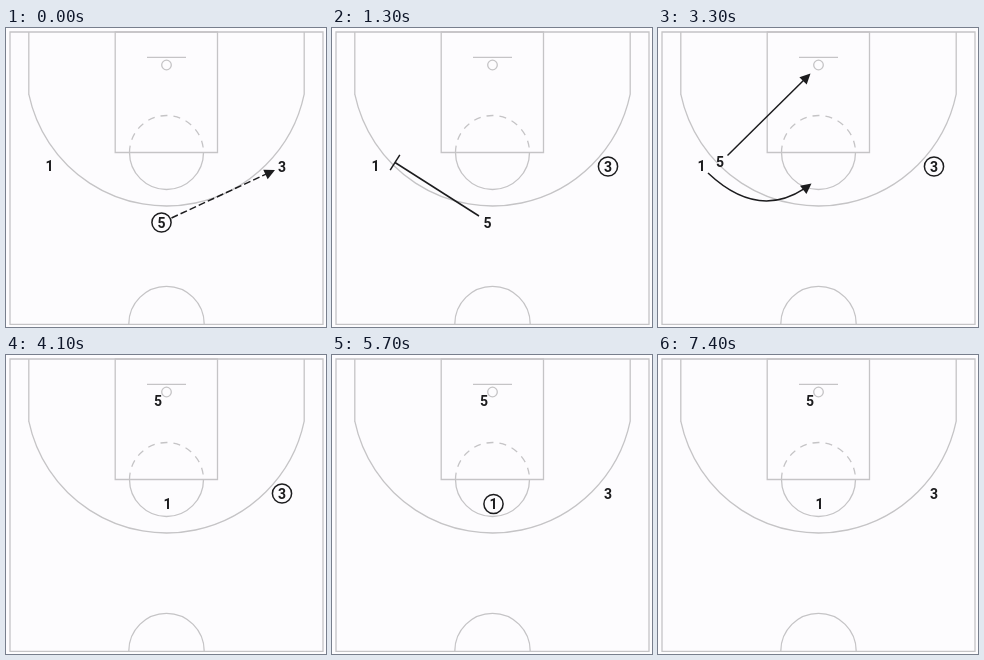
An HTML page with a canvas for the animation above (7500 ms loop, 320 by 299 pixels).

```html
<!DOCTYPE html>
<html lang="en">
<head>
<meta charset="utf-8">
<title>Basketball play</title>
<style>
html, body { margin: 0; width: 100%; height: 100%; overflow: hidden; background: #fdfcfe; }
canvas { display: block; width: 320px; height: 299px; }
</style>
</head>
<body>
<canvas id="stage"></canvas>
<script>
const LOOP = 7500, STEP = 100;
const INK = '#1c1c1e', LINE = '#c5c4c6';
const canvas = document.getElementById('stage');
const ctx = canvas.getContext('2d');
const ratio = window.devicePixelRatio || 1;
canvas.width = 320 * ratio;
canvas.height = 299 * ratio;
ctx.scale(ratio, ratio);

const progress = (t, start, end) => Math.min(1, Math.max(0, (t - start) / (end - start)));
const mix = (a, b, p) => [a[0] + (b[0] - a[0]) * p, a[1] + (b[1] - a[1]) * p];
const curve = (a, c, b, p) => mix(mix(a, c, p), mix(c, b, p), p);

function stroke(color, width, build, dash = []) {
  ctx.strokeStyle = color;
  ctx.lineWidth = width;
  ctx.setLineDash(dash);
  ctx.beginPath();
  build();
  ctx.stroke();
  ctx.setLineDash([]);
}
const segment = (a, b) => { ctx.moveTo(...a); ctx.lineTo(...b); };
const circle = (c, r) => ctx.arc(c[0], c[1], r, 0, Math.PI * 2);

const HOOP = [160.5, 37];
const ONE = { start: [43.5, 137.5], bend: [103, 203], end: [161.5, 149] };
const FIVE = { start: [155.5, 194.5], screen: [62, 134], end: [152, 46] };
const THREE = [276, 138.5];

// Each mark is drawn from start to end, then capped, and stays until the next move.
const marks = [
  { from: [165.5, 190], to: [269, 142], start: -900, end: -200, until: 300, cap: head, dash: [7, 3] },
  { from: [147, 188], to: [63, 134.5], start: 600, end: 1200, until: 1900, cap: bar },
  { from: [50, 145], bend: [103, 195], to: [153.5, 155.5], start: 2200, end: 2970, until: 3800, cap: head },
  { from: [69.5, 127.5], to: [152.5, 45.5], start: 2700, end: 3200, until: 3800, cap: head },
  { from: [266, 139.5], to: [170, 148], start: 4100, end: 4700, until: 5400, cap: head, dash: [7, 3] },
  { from: [161.5, 139], to: [160.5, 40], start: 5700, end: 6200, until: 6900, cap: target, dash: [7, 3] }
];

function head(tip, angle) {
  ctx.save();
  ctx.translate(...tip);
  ctx.rotate(angle);
  ctx.fillStyle = INK;
  ctx.beginPath();
  ctx.moveTo(0, 0);
  ctx.lineTo(-10.5, -5.2);
  ctx.lineTo(-10.5, 5.2);
  ctx.fill();
  ctx.restore();
}

function bar([x, y], angle) {
  const dx = -Math.sin(angle) * 9, dy = Math.cos(angle) * 9;
  stroke(INK, 1.5, () => segment([x - dx, y - dy], [x + dx, y + dy]));
}

function target() {
  const [x, y] = HOOP;
  stroke(INK, 1.5, () => circle(HOOP, 6));
  stroke(INK, 1.5, () => {
    for (const s of [-1, 1]) {
      segment([x + 3 * s, y], [x + 9 * s, y]);
      segment([x, y + 3 * s], [x, y + 9 * s]);
    }
  });
}

function drawMark(mark, t) {
  if (t <= mark.start || t > mark.until) return;
  const { from, to, cap } = mark;
  const bend = mark.bend || mix(from, to, 0.5);
  const reach = progress(t, mark.start, mark.end) * (cap === head ? 0.93 : 1);
  stroke(INK, 1.5, () => {
    ctx.moveTo(...from);
    ctx.quadraticCurveTo(...mix(from, bend, reach), ...curve(from, bend, to, reach));
  }, mark.dash);
  if (t > mark.end) cap(to, Math.atan2(to[1] - bend[1], to[0] - bend[0]));
}

function drawCourt() {
  const lane = [160.5, 124.5];
  ctx.fillStyle = '#fdfcfe';
  ctx.fillRect(0, 0, 320, 299);
  const court = (build, dash) => stroke(LINE, 1.3, build, dash);
  court(() => ctx.rect(4, 4, 313, 292.3));
  court(() => {
    ctx.moveTo(22.8, 4);
    ctx.lineTo(22.8, 67);
    const radius = 140.7, sweep = Math.asin(137.7 / radius);
    ctx.arc(160.5, 178 - radius, radius, Math.PI / 2 + sweep, Math.PI / 2 - sweep, true);
    ctx.lineTo(298.2, 4);
  });
  court(() => ctx.rect(109.2, 4, 102.3, 120.5));
  court(() => ctx.arc(...lane, 37, 0, Math.PI));
  court(() => ctx.arc(...lane, 37, Math.PI, Math.PI * 2), [7, 6]);
  court(() => ctx.arc(160.5, 296, 37.7, Math.PI, Math.PI * 2));
  court(() => segment([141, 29.3], [180, 29.3]));
  court(() => circle(HOOP, 4.8));
}

function drawPlayer(label, [x, y]) {
  ctx.fillStyle = INK;
  ctx.font = '700 14px Roboto, sans-serif';
  ctx.textAlign = 'center';
  ctx.fillText(label, x, y + 5);
}

function draw(t) {
  const one = curve(ONE.start, ONE.bend, ONE.end, progress(t, 3800, 4100));
  const five = t < 3800
    ? mix(FIVE.start, FIVE.screen, progress(t, 1900, 2200))
    : mix(FIVE.screen, FIVE.end, progress(t, 3800, 4100));
  let ball = mix(FIVE.start, THREE, progress(t, 300, 600));
  if (t > 5400) ball = mix(THREE, ONE.end, progress(t, 5400, 5700));
  if (t > 6900) ball = mix(ONE.end, HOOP, progress(t, 6900, 7300));

  drawCourt();
  marks.forEach(mark => drawMark(mark, t));
  drawPlayer('1', one);
  drawPlayer('5', five);
  drawPlayer('3', THREE);
  if (t < 7400) stroke(INK, 1.5, () => circle(ball, 9.6));
}

const origin = performance.now();
function tick() {
  const t = (performance.now() - origin) % LOOP;
  draw(Math.floor(t / STEP) * STEP);
  requestAnimationFrame(tick);
}
tick();
</script>
</body>
</html>
```
